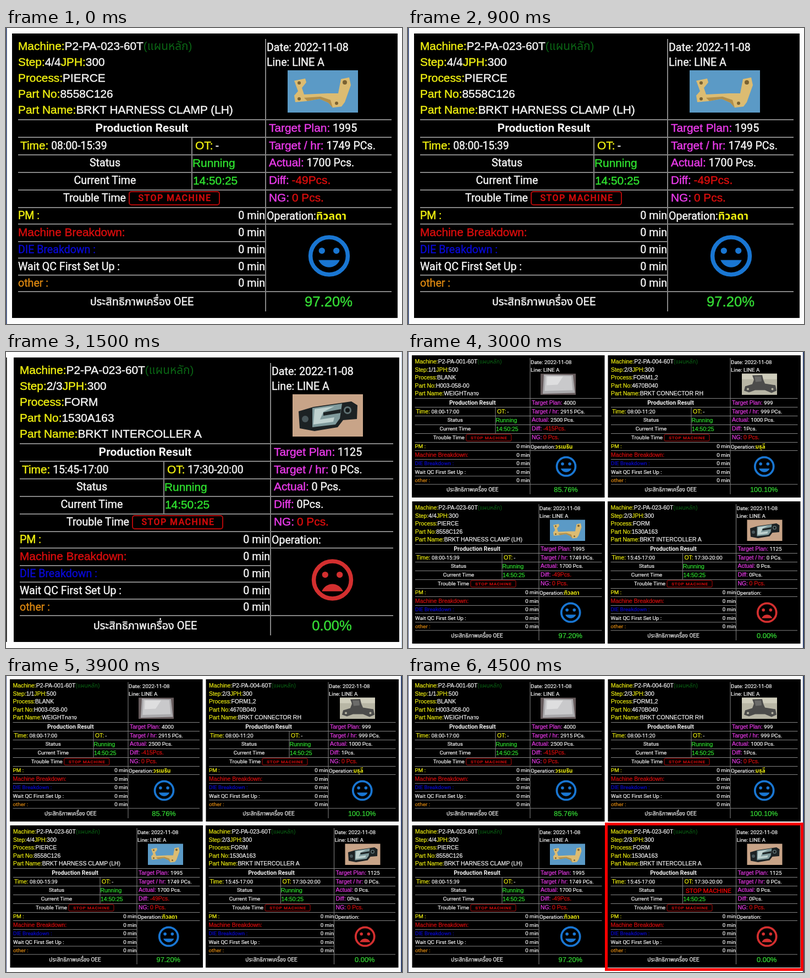
Animation of 720 by 539 pixels, one loop 6000 ms. Source, as an HTML page:

```html
<!DOCTYPE html>
<html lang="en">
<head>
<meta charset="utf-8">
<title>Machine status board</title>
<style>
html, body { margin: 0; width: 100%; height: 100%; overflow: hidden; background: #fdfdfd; }
svg { display: block; width: 720px; height: 539px; }
text, tspan { fill: currentColor; stroke: currentColor; stroke-width: .45px; }
text { font: 19.6px Roboto, "Noto Sans Thai", sans-serif; color: #f4f4f4; white-space: pre; }
.zoom { filter: blur(.75px); }
.arial { font: 20.85px "Liberation Sans", Arial, "Noto Sans Thai", sans-serif; }
.hours { font-size: 19.3px; }
.title { font-size: 21px; font-weight: 700; stroke: none; }
.bold { font-weight: 700; stroke: none; }
.yellow { color: #eeee10; }
.green { color: #2fe02f; }
.leaf { color: #0a6414; stroke: none; }
.pink { color: #e83ae8; }
.red { color: #d80d0d; }
.blue { color: #0808d0; }
.orange { color: #d98610; }
.oee { font-size: 20px; }
.percent { font-size: 25.6px; color: #35dc35; }
.button { font-size: 16px; font-weight: 500; letter-spacing: 1.43px; color: #d00a0a; }
.alarm { font-size: 23px; color: #f00; }
.rules { stroke: #858585; stroke-width: 2; fill: none; }
</style>
</head>
<body>
<svg id="stage" viewBox="0 0 720 539"></svg>
<script>
const W = 701, H = 518, LEFT = 11, RIGHT = 690;
const ROWS = [179, 211, 242, 274, 306, 338, 369, 400, 431, 461, 495];

const span = (cls, str) => `<tspan class="${cls}">${str}</tspan>`;
const text = (x, y, body, anchor = 'start') =>
  `<text x="${x}" y="${y}" text-anchor="${anchor}">${body}</text>`;
const rect = (x, y, w, h, fill, extra = '') =>
  `<rect x="${x}" y="${y}" width="${w}" height="${h}" fill="${fill}" ${extra}/>`;
const poly = (fill, points) => `<polygon fill="${fill}" points="${points}"/>`;
const dot = (x, y, r, fill) => `<circle cx="${x}" cy="${y}" r="${r}" fill="${fill}"/>`;

// Part pictures, 128 by 77
const photos = {
  plate: rect(0, 0, 128, 77, '#655a5b') +
    poly('#aaa9ac', '12,3 118,5 125,70 8,73') +
    poly('#c9c9cb', '18,8 112,9 117,60 15,63') +
    poly('#dededf', '24,10 82,10 62,40 22,42'),
  clip: rect(0, 0, 128, 77, '#b8b6a5') +
    rect(0, 0, 128, 20, '#cfcdbc') +
    poly('#4c4c4b', '38,6 74,5 78,22 84,36 122,42 126,62 108,70 84,60 48,60 26,68 8,62 12,46 38,38 44,22') +
    poly('#6b6b69', '46,10 70,10 72,28 50,30') +
    dot(22, 56, 4, '#b8b6a5') + dot(111, 56, 4, '#b8b6a5'),
  brass: rect(0, 0, 128, 77, '#5b9ac6') +
    poly('#dcbc72', '12,19 32,15 34,22 26,32 30,44 72,42 92,42 97,16 112,13 115,27 104,58 98,66 82,68 74,59 58,52 36,56 14,58 12,46 19,38') +
    poly('#b08f4c', '30,50 60,48 78,54 82,68 74,59 58,52 36,56') +
    dot(21, 23, 3, '#7a6232') + dot(21, 52, 3, '#7a6232') +
    dot(104, 22, 4, '#7a6232') + dot(89, 60, 3, '#7a6232'),
  steel: rect(0, 0, 128, 77, '#c8a488') +
    poly('#1c2224', '11,31 38,23 107,13 118,20 117,45 92,47 82,60 40,67 13,62') +
    poly('#7f9a9c', '36,25 90,17 86,44 78,55 36,60') +
    poly('#c0d2d0', '40,27 76,22 56,32 50,46 76,42 74,50 38,55') +
    poly('#1c2325', '56,33 88,27 87,34 56,39') +
    dot(100, 29, 7, '#5f7173') + dot(100, 29, 4, '#15191a') + dot(23, 45, 6, '#48565a')
};

function face(x, y, happy) {
  const color = happy ? '#1976d2' : '#d32f2f';
  const mouth = happy
    ? 'M0 5.5c2.33 0 4.31-1.46 5.11-3.5H-5.11c.8 2.04 2.78 3.5 5.11 3.5z'
    : 'M0 2c-2.33 0-4.31 1.46-5.11 3.5H5.11c-.8-2.04-2.78-3.5-5.11-3.5z';
  return `<g transform="translate(${x} ${y}) scale(3.77)" fill="${color}">
    <circle r="9" fill="none" stroke="${color}" stroke-width="2"/>
    ${dot(-3.5, -2.5, 1.5, color)}${dot(3.5, -2.5, 1.5, color)}<path d="${mouth}"/></g>`;
}

const machines = [
  { id: '001', step: '1/1', jph: 500, process: 'BLANK', no: 'H003-058-00', name: 'WEIGHTกลาง',
    time: '08:00-17:00', ot: '-', plan: 4000, rate: 2915, actual: 2500, diff: -415,
    who: 'วรเมธิน', oee: '85.76', photo: 'plate', px: 468, split: 430, mid: 304 },
  { id: '004', step: '2/3', jph: 300, process: 'FORM1,2', no: '4670B040', name: 'BRKT CONNECTOR RH',
    time: '08:00-11:20', ot: '-', plan: 999, rate: 999, actual: 1000, diff: 1,
    who: 'มธุลี', oee: '100.10', photo: 'clip', px: 487, split: 445, mid: 303 },
  { id: '023', step: '4/4', jph: 300, process: 'PIERCE', no: '8558C126', name: 'BRKT HARNESS CLAMP (LH)',
    time: '08:00-15:39', ot: '-', plan: 1995, rate: 1749, actual: 1700, diff: -49,
    who: 'ทิวลดา', oee: '97.20', photo: 'brass', px: 501, split: 461, mid: 327 },
  { id: '023', step: '2/3', jph: 300, process: 'FORM', no: '1530A163', name: 'BRKT INTERCOLLER A',
    time: '15:45-17:00', ot: '17:30-20:00', plan: 1125, rate: 0, actual: 0, diff: 0,
    who: '', oee: '0.00', photo: 'steel', px: 507, split: 467, mid: 273 }
];

function rules({ split, mid }) {
  const full = [157, 189, 221, 253, 285, 317, 347, 470].map(y => `M${LEFT} ${y}H${RIGHT}`);
  const left = [379, 409, 440].map(y => `M${LEFT} ${y}H${split}`);
  return `<path class="rules" d="${full.join('')}${left.join('')}M${split} 10V506M${mid} 189V285"/>`;
}

function panel(m, x, y, scale, stopped) {
  const { split, mid } = m;
  const center = (LEFT + split) / 2, status = (LEFT + mid) / 2, side = (split + RIGHT) / 2;
  const label = str => span('arial yellow', str);
  const plain = str => span('arial', str);
  const hours = str => span('hours', ' ' + str);
  const stat = (row, name, value) =>
    text(split + 6, ROWS[row], span('arial pink', name + ':') + ' ' + value);

  const head = [
    label('Machine:') + plain(`P2-PA-${m.id}-60T`) + span('arial leaf', '(แผนหลัก)'),
    label('Step:') + plain(m.step) + label('JPH:') + plain(m.jph),
    label('Process:') + plain(m.process),
    label('Part No:') + plain(m.no),
    label('Part Name:') + plain(m.name)
  ].map((body, i) => text(LEFT, 30 + 29.1 * i, body)).join('');

  const losses = [
    ['yellow', 'PM :'], ['arial red', 'Machine Breakdown:'], ['blue', 'DIE Breakdown :'],
    ['', 'Wait QC First Set Up :'], ['orange', 'other :']
  ].map(([cls, str], i) => text(LEFT, ROWS[5 + i], span(cls, str)) +
    text(split - 1, ROWS[5 + i], '0 min', 'end')).join('');

  const state = stopped
    ? text(mid + 11, 245, span('alarm', 'STOP MACHINE'))
    : text(mid + 1, ROWS[2] + 1, span('arial green', 'Running'));

  return `<g transform="translate(${x} ${y}) scale(${scale})">` +
    rect(0, 0, W, H, '#000') + rules(m) + head +
    text(split + 2, 31.5, 'Date: 2022-11-08') +
    text(split + 2, 59, 'Line: LINE A') +
    `<g transform="translate(${m.px} 67)">${photos[m.photo]}</g>` +
    text(center, ROWS[0], span('title', 'Production Result'), 'middle') +
    text(15, ROWS[1], label('Time:') + hours(m.time)) +
    text(mid + 6, ROWS[1], label('OT:') + hours(m.ot)) +
    text(status, ROWS[2], 'Status', 'middle') + state +
    text(status, ROWS[3], 'Current Time', 'middle') +
    text(mid + 2, ROWS[3] + 1, span('arial green', '14:50:25')) +
    text(center - 29, ROWS[4], 'Trouble Time', 'end') +
    rect(center - 23, 288, 164, 24, 'none', 'rx="4" stroke="#b00808" stroke-width="2"') +
    text(center + 60, 305, span('button', 'STOP MACHINE'), 'middle') +
    stat(0, 'Target Plan', m.plan) +
    stat(1, 'Target / hr', m.rate + ' PCs.') +
    stat(2, 'Actual', m.actual + ' Pcs.') +
    stat(3, 'Diff', span(m.diff < 0 ? 'arial red' : '', m.diff + 'Pcs.')) +
    stat(4, 'NG', span('arial red', '0 Pcs.')) +
    losses +
    text(split + 2, ROWS[5] + 1, 'Operation:' + span('yellow bold', m.who)) +
    face(side + 1, 405, m.oee > 50) +
    text(center, ROWS[10], span('oee', 'ประสิทธิภาพเครื่อง OEE'), 'middle') +
    text(side, 497, span('arial percent', m.oee + '%'), 'middle') +
    '</g>';
}

const spots = [[7, 6], [363.5, 6], [7.5, 272], [363, 272]];
const zoom = (m, x, edges) => `<g class="zoom">${edges}${panel(m, x, 10, 1)}</g>`;
const board = stopped =>
  rect(0, 0, 1, 539, '#3d4c78') + rect(718, 0, 2, 539, '#30436f') +
  machines.map((m, i) => panel(m, ...spots[i], 0.5, stopped && i === 3)).join('');

const scenes = [
  zoom(machines[2], 11, rect(0, 0, 1.5, 539, '#26386b')),
  zoom(machines[3], 14, rect(0, 10, 1.5, H, '#000') + rect(719, 0, 1, 539, '#b9cbe4')),
  board(false),
  board(true) + rect(360.5, 269.5, 356, 265, 'none', 'stroke="#f00" stroke-width="5"')
];

const stage = document.getElementById('stage');
stage.innerHTML = scenes.map(s => `<g>${s}</g>`).join('');

function draw() {
  const now = Math.floor(performance.now() % 6000 / 1500);
  [...stage.children].forEach((g, i) => g.style.display = i === now ? '' : 'none');
  requestAnimationFrame(draw);
}
draw();
</script>
</body>
</html>
```
